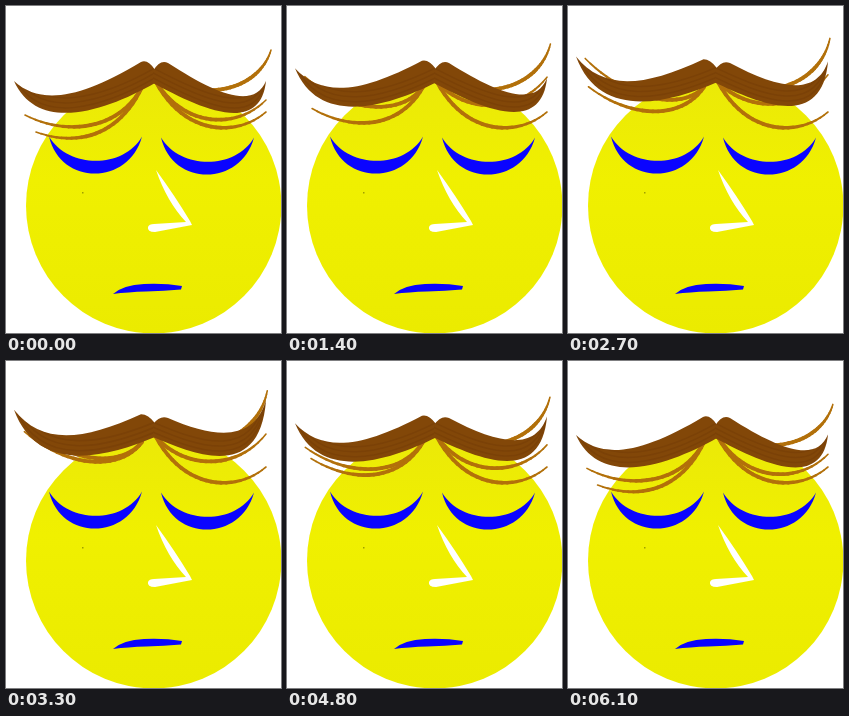
An HTML page with a canvas that plays this animation: 275 px wide and 327 px high, repeating every 6.2 s.

```html
<!DOCTYPE html>
<html lang="en">
<head>
<meta charset="utf-8">
<title>Sleepy face</title>
<style>
  html, body { margin: 0; width: 100%; height: 100%; overflow: hidden; background: #fff; }
  canvas { display: block; }
</style>
</head>
<body>
<canvas id="stage" width="275" height="327"></canvas>
<script>
const ctx = document.getElementById('stage').getContext('2d');
const LOOP = 6200, STEP = 100;
const BLUE = '#0a04ff';

const mix = (a, b, u) => a + (b - a) * u;

// Climbs from 0 to 1 at the peak time, then falls back evenly by the loop's end.
const swing = (t, peak, power = 1) =>
  t < peak ? (t / peak) ** power : (LOOP - t) / (LOOP - peak);

function fillPath(color, d) {
  ctx.fillStyle = color;
  ctx.fill(new Path2D(d));
}

function drawFace() {
  const shade = ctx.createLinearGradient(0, 72, 0, 327);
  shade.addColorStop(0, '#ebe908');
  shade.addColorStop(.4, '#f0f000');
  shade.addColorStop(1, '#ebeb00');
  ctx.fillStyle = shade;
  ctx.beginPath();
  ctx.arc(147.7, 199.7, 127.7, 0, Math.PI * 2);
  ctx.fill();

  for (const x of [0, 112]) {
    ctx.save();
    ctx.translate(x, x / 112 - .6);
    fillPath(BLUE, 'M43 131C55 181 123 180 136 131C118 163 63 164 43 131Z');
    ctx.restore();
  }
  fillPath('#fff', 'M150 164Q169 190 184 215L186 219L149 226Q141 226 142 221Q143 218 148 218L180 216Q161 196 150 164Z');
  fillPath(BLUE, 'M107 288Q117 279 138 278Q158 277 176 280L175 283.5Q158 285 140 285.5Q122 286 107 288Z');
  ctx.fillStyle = '#a0a000';
  ctx.fillRect(76, 186, 1.5, 1.5);
}

// A lock of hair along a cubic curve, thinning towards its tip.
function drawLock(tip, c1, c2, root) {
  const at = s => [0, 1].map(k => (1 - s) ** 3 * tip[k] + 3 * s * (1 - s) ** 2 * c1[k]
    + 3 * s * s * (1 - s) * c2[k] + s ** 3 * root[k]);
  const pieces = 24;
  ctx.strokeStyle = '#b2700a';
  ctx.lineCap = 'round';
  for (let i = 0; i < pieces; i++) {
    const s = i / pieces;
    ctx.lineWidth = 1.6 + 2.2 * Math.min(1, s * 2.5);
    ctx.beginPath();
    ctx.moveTo(...at(s));
    ctx.lineTo(...at(s + 1 / pieces));
    ctx.stroke();
  }
}

function drawLeftLock(x, y) {
  const lift = 126 - y;
  drawLock([x, y], [x + 41, 141 - .64 * lift], [113, 130 - .33 * lift], [136, 81]);
}

function drawRightLock(y) {
  const lift = 106 - y;
  drawLock([260, y], [231, 131 - .65 * lift], [179, 130 - .65 * lift], [150, 76]);
}

function drawCurl(u) {
  drawLock([mix(265, 261, u), mix(44, 29, u)], [mix(258, 256, u), mix(68, 56, u)],
    [mix(232, 235, u), mix(87, 80, u)], [195, 84]);
}

// Key points of each side: [x, resting y, raised y].
const leftHair = {
  tip: [8, 75, 47], topOuter: [35, 100, 82], topInner: [75, 92, 80], crest: [135, 56, 53],
  bump: [142, 53, 53], notch: [149, 64, 62], root: [149, 77, 76],
  lowInner: [100, 105, 96], lowOuter: [32, 128, 113]
};
const rightHair = {
  tip: [260, 75, 36], topOuter: [248, 104, 78], topInner: [210, 88, 77], crest: [162, 57, 57],
  bump: [154, 53, 54], notch: [147, 65, 63], root: [147, 77, 76],
  lowInner: [190, 100, 94], lowOuter: [254, 132, 119]
};

function drawHair(side, u) {
  const p = {};
  for (const key in side) p[key] = [side[key][0], mix(side[key][1], side[key][2], u)];
  const lowerEdge = () => ctx.bezierCurveTo(...p.lowInner, ...p.lowOuter, ...p.tip);

  ctx.save();
  ctx.beginPath();
  ctx.moveTo(...p.tip);
  ctx.bezierCurveTo(...p.topOuter, ...p.topInner, ...p.crest);
  ctx.quadraticCurveTo(...p.bump, ...p.notch);
  ctx.lineTo(...p.root);
  lowerEdge();
  ctx.fillStyle = '#824708';
  ctx.fill();
  ctx.clip();

  ctx.strokeStyle = 'rgba(100,50,4,.25)';
  ctx.lineWidth = 1.5;
  for (let i = 0; i < 3; i++) {
    ctx.translate(0, -5);
    ctx.beginPath();
    ctx.moveTo(...p.root);
    lowerEdge();
    ctx.stroke();
  }
  ctx.restore();
}

function draw(time) {
  const t = Math.floor(time % LOOP / STEP) * STEP;
  ctx.fillStyle = '#fff';
  ctx.fillRect(0, 0, 275, 327);
  drawFace();

  const inner = swing(t, 2300), outer = swing(t, 3400);
  drawLeftLock(mix(19, 17, inner), mix(109, 46, inner));
  drawLeftLock(mix(30, 18, outer), mix(126, 69, outer));
  drawRightLock(mix(94, 63, swing(t, 1900)));
  drawRightLock(106);
  drawCurl(swing(t, 3500));

  drawHair(leftHair, swing(t, 3100));
  drawHair(rightHair, swing(t, 3400, 3));
}

const start = performance.now();
function tick() {
  draw(performance.now() - start);
  requestAnimationFrame(tick);
}
tick();
</script>
</body>
</html>
```
